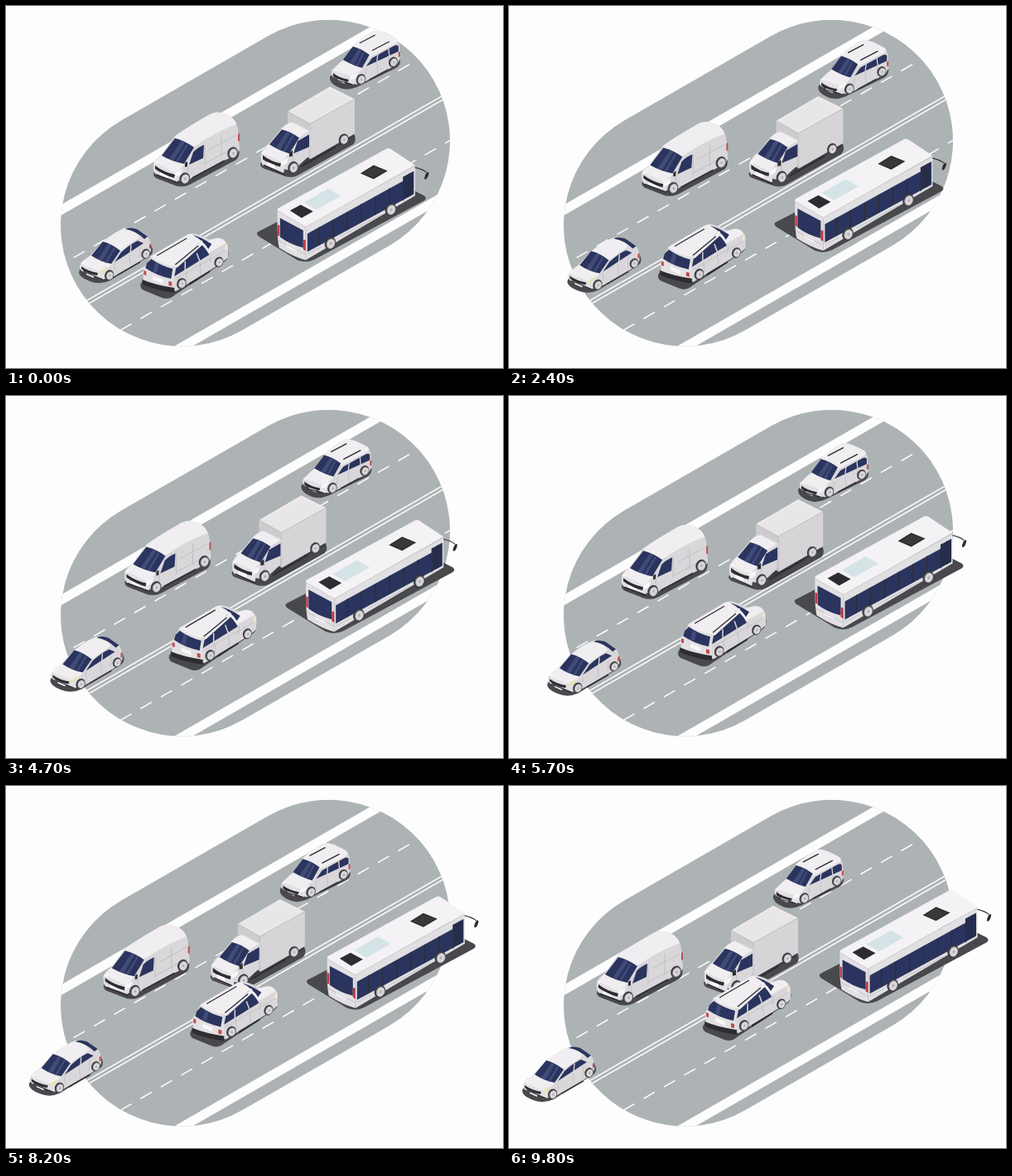
Recreate the animation shown at these times as an HTML page with a canvas. Size 600 by 438 pixels, loop 9900 ms.

```html
<!DOCTYPE html>
<html lang="en">
<head>
<meta charset="utf-8">
<title>Isometric traffic</title>
<style>
html, body { margin: 0; width: 100%; height: 100%; overflow: hidden; background: #fefdfe; }
canvas { display: block; }
</style>
</head>
<body>
<canvas id="stage" width="600" height="438"></canvas>
<script>
const g = document.getElementById('stage').getContext('2d');
const LOOP = 9900, STEP = 100, SLOPE = 0.577;
const roof = '#f0eef0', front = '#e2e0e2', side = '#d9d7da', crease = '#b9b8bc';
const glass = '#2b345e', glare = '#414b78', dark = '#2d2c31', shadow = '#49484c';

function fill(color, d) {
  g.fillStyle = color;
  g.fill(new Path2D(d));
}

function line(color, width, d) {
  g.strokeStyle = color;
  g.lineWidth = width;
  g.stroke(new Path2D(d));
}

function disc(color, x, y, rx, ry) {
  g.fillStyle = color;
  g.beginPath();
  g.ellipse(x, y, rx, ry, 0.4, 0, Math.PI * 2);
  g.fill();
}

function wheel(x, y, r = 6.8) {
  disc('#3b3a3f', x - 0.4, y - 0.2, r * 0.82, r);
  disc('#8b8a8e', x + 0.3, y + 0.2, r * 0.66, r * 0.82);
  disc('#d9d7d9', x + 0.4, y + 0.2, r * 0.56, r * 0.7);
  disc('#aeadb1', x + 0.4, y + 0.2, r * 0.18, r * 0.22);
}

// Road markings run along y = c - SLOPE * x.
function lane(c, from, to, width, dash = []) {
  g.strokeStyle = '#fefdfe';
  g.lineWidth = width;
  g.setLineDash(dash);
  g.beginPath();
  g.moveTo(from, c - SLOPE * from);
  g.lineTo(to, c - SLOPE * to);
  g.stroke();
  g.setLineDash([]);
}

function road() {
  const r = 146.4, a = Math.PI / 3;
  g.beginPath();
  g.arc(212.4, 264.6, r, a, a + Math.PI);
  g.arc(389.6, 162.4, r, a + Math.PI, a + 2 * Math.PI);
  g.closePath();
  g.fillStyle = '#adb3b4';
  g.fill();
  g.clip();
  const unit = Math.hypot(1, SLOPE), dash = [13.5 * unit, 11 * unit];
  lane(284.6, 40, 560, 11);
  lane(534.5, 150, 560, 11);
  lane(412, 60, 560, 1.6);
  lane(417, 60, 560, 1.6);
  lane(351, 81.5, 560, 1.5, dash);
  lane(471.3, 138, 560, 1.5, dash);
}

function minivan() {
  fill(shadow, 'M390 85Q391 80 403 75L470 52L475 63Q476 69 470 73L423 96Q411 101 402 97Q390 92 390 85Z');
  fill(side, 'M392 78L407 63L419 46Q434 32 443 28Q452 26 470 37L474 44L475 62L471 69L428 92Q421 94 414 91L395 84Z');
  fill(roof, 'M417 46Q432 33 443 28Q450 26 470 37Q474 40 470 43L438 60Z');
  fill(front, 'M392 78Q395 71 407 64L430 73L424 82L419 93L396 85Q391 83 392 78Z');
  fill(roof, 'M395 76Q398 69 407 63L430 73L419 84Z');
  fill(glass, 'M406 63L418 47Q427 49 438 57L429 73Q418 70 406 63Z');
  fill(glare, 'M414 67L425 50L429 52L419 69ZM421 70L430 54L432 55L424 71Z');
  fill(glass, 'M434 71L441 61L468 46Q472 44 473 47L473 53Z');
  line(side, 1.3, 'M448 56L447 65M461 49L462 59');
  line(dark, 1.4, 'M426 43L445 33M441 52L462 41');
  line(crease, 0.7, 'M434 74L433 82M447 67L448 80M462 60L461 66');
  fill(dark, 'M394 79Q401 85 413 87L412 90Q399 88 394 83Z');
  fill('#f7f5f7', 'M399 86L408 89V92L399 88ZM415 83L424 80L420 86L414 88ZM392 76L397 73L396 77Z');
  fill('#bc4b50', 'M473 54L475 53V59L473 60Z');
  line(dark, 1.2, 'M397 87L417 93M438 87L460 75');
  wheel(428, 87);
  wheel(467, 66, 6.4);
}

function van() {
  fill(shadow, 'M178 203Q179 197 190 190L272 154L281 173Q283 181 278 186L222 216Q212 221 201 216L183 209Q178 207 178 203Z');
  fill(side, 'M178 191L189 178L204 157L246 131Q255 126 267 131Q278 137 280 149L282 173L279 179L215 213L181 204Q177 200 178 191Z');
  fill(roof, 'M203 159Q206 154 246 131Q255 126 267 131Q276 136 278 143Q252 153 226 171Z');
  fill(front, 'M178 191Q180 184 190 179L216 191L209 202L207 214L182 204Q177 200 178 191Z');
  fill(roof, 'M181 190Q183 182 190 179L216 191L205 202Z');
  fill(glass, 'M188 181L204 160Q216 163 227 171L215 191Q200 188 188 181Z');
  fill(glare, 'M197 185L212 163L216 165L202 187ZM205 188L218 167L220 168L208 189Z');
  fill(glass, 'M221 192L226 177Q230 172 239 168L238 184Z');
  line(crease, 0.8, 'M219 194L220 205M240 168L240 193M260 156V182M245 174L278 156M241 190L278 170');
  fill(dark, 'M180 193Q190 201 204 204L203 208Q189 204 180 197ZM216 190L219 188V194L216 195Z');
  fill('#f8f6f8', 'M186 201L196 206V210L186 206ZM204 202L213 197L211 204L204 207ZM178 190L183 186L182 192Z');
  fill('#b85257', 'M280 155L282 154V163L280 164Z');
  line(dark, 1.7, 'M181 204L208 214M225 208L264 187');
  wheel(216, 209, 7.5);
  wheel(274, 178, 7.5);
}

function truck() {
  fill(shadow, 'M307 190L330 174L404 139L420 154Q424 162 419 167L353 204Q344 209 333 204L311 196Q307 194 307 190Z');
  fill('#3d3c41', 'M358 184L420 151V158L358 193Z');
  fill('#cdcbcd', 'M340 127L367 142V184L340 169Z');
  fill('#d6d4d6', 'M367 142L421 112V154L367 185Z');
  fill('#e9e6e8', 'M340 127L391 97L421 112L367 142Z');
  line('#c0bec1', 1, 'M340 127L367 142L421 112M367 142V184');
  line('#f3f0f2', 0.8, 'M343 126L391 99L418 112');
  fill(side, 'M308 178L320 163L333 147Q340 140 349 141L367 150V180L346 199L312 192Q307 189 308 178Z');
  fill(roof, 'M332 149Q337 142 345 140L366 151L352 160Z');
  fill(front, 'M308 179Q310 170 319 165L342 176L337 188L335 203L311 193Q307 190 308 179Z');
  fill(roof, 'M311 178Q313 169 319 165L342 176L333 188Z');
  fill(glass, 'M318 167L333 149Q343 151 354 159L342 178Q329 174 318 167Z');
  fill(glare, 'M326 171L339 151L343 153L331 174ZM334 175L346 155L348 156L337 176Z');
  fill(glass, 'M347 178L352 163L366 155V170Z');
  line(crease, 0.8, 'M346 180L347 190M366 172V184');
  fill(dark, 'M310 180Q320 188 332 190L331 194Q318 191 310 185ZM342 177L346 174V181L342 182Z');
  fill('#f8f6f8', 'M315 188L325 192V197L315 193ZM332 188L341 183L339 190L332 193ZM308 177L313 173L312 179Z');
  line(dark, 1.7, 'M311 192L336 203M356 194L398 170');
  wheel(347, 195, 7.5);
  wheel(408, 161, 7);
}

function sedan() {
  fill(shadow, 'M88 321Q89 315 99 309L168 279L176 290Q179 297 174 301L126 331Q114 337 101 332Q88 327 88 321Z');
  fill(side, 'M89 313L102 300L118 283L141 269Q149 266 162 272L172 279Q176 286 175 296L168 304L127 328Q118 331 110 327L92 319Z');
  fill(roof, 'M117 284Q133 271 144 268Q155 268 161 279L137 296Z');
  fill(front, 'M89 313Q92 305 104 301L128 311L121 319L118 330L94 321Q88 318 89 313Z');
  fill(roof, 'M92 312Q95 304 104 300L128 311L116 321Z');
  fill(glass, 'M103 301L117 284Q128 287 138 295L127 311Q113 308 103 301Z');
  fill(glare, 'M111 305L123 287L127 289L116 308ZM119 309L130 291L132 292L122 310Z');
  fill(glass, 'M131 309L139 297Q150 287 159 283L166 286Z');
  fill(glass, 'M144 269Q149 266 158 269L171 278L167 281Q157 271 144 269Z');
  line(side, 1.4, 'M151 288L150 299');
  line(crease, 0.7, 'M131 310L131 319M149 300L150 312M162 291L161 304');
  fill(dark, 'M91 314Q99 320 111 322L110 325Q97 323 91 317Z');
  fill('#f8f6f8', 'M97 321L106 325V328L97 324ZM90 310L95 307L94 311Z');
  fill('#e5e4ae', 'M113 320L122 315L119 321L113 323Z');
  fill('#b94e54', 'M173 288L175 286V292L173 293Z');
  line(dark, 1.2, 'M93 320L117 330M136 324L162 309');
  wheel(125, 325, 6.6);
  wheel(169, 299, 6.2);
}

function wagon() {
  fill(shadow, 'M161 340Q161 335 170 331L255 286L267 298Q269 306 263 311L202 352Q195 358 187 355L165 346Q161 344 161 340Z');
  fill(side, 'M164 324L174 305L218 279Q225 274 243 284L263 286Q268 291 267 306L259 313L204 347L166 337Z');
  fill(front, 'M164 322L174 305L201 318L202 347L165 337Z');
  fill(roof, 'M173 305L217 279Q225 275 236 285L203 317Q186 315 173 305Z');
  fill(roof, 'M235 290L246 285Q260 279 264 289L241 302Z');
  fill(glass, 'M169 313L174 308Q185 316 200 320L198 332Q180 328 167 319Z');
  fill(glare, 'M176 323L179 312L183 315L181 325Z');
  fill(glass, 'M204 319L232 288Q240 295 244 303L202 329Z');
  fill(glass, 'M224 279Q233 281 247 290L243 296Q237 286 224 279Z');
  fill(roof, 'M202 319L235 285L237 290L206 318Z');
  line(side, 1.5, 'M215 311L215 322M229 301L233 312');
  line(dark, 1.3, 'M181 304L217 283M203 315L231 292');
  line(crease, 0.7, 'M216 323L217 335M233 313L234 327M246 302L245 312M204 332L265 297');
  fill('#c5494f', 'M165 322L168 323V328L165 327ZM195 335L199 336V341L195 340Z');
  fill('#f8f6f8', 'M176 328L188 333V338L176 333Z');
  fill(dark, 'M163 333Q180 340 202 343V349Q180 346 164 339ZM220 337L245 322V324L220 340Z');
  fill('#f1e9cf', 'M263 292L266 290V296L263 298Z');
  wheel(211, 338, 6.8);
  wheel(256, 312, 6.5);
}

function bus() {
  fill(shadow, 'M303 275L330 261L350 284L480 219L504 231Q508 234 504 237L372 308Q362 313 351 309L304 280Q301 277 303 275Z');
  fill(front, 'M327 249L361 268V309Q346 305 329 294Q326 282 327 249Z');
  fill('#e0dfe1', 'M361 268L493 195V231L361 309Z');
  fill('#f4f2f4', 'M327 249Q326 247 330 245L459 174Q462 173 466 176L493 194L361 269Z');
  line('#cbcacd', 0.9, 'M328 250L361 269L493 195M361 269V308');
  fill(glass, 'M330 258L358 273V294Q342 290 330 281Z');
  fill(glass, 'M363 277L479 213V236L363 299Z');
  fill('#252d50', 'M479 208L492 201V229L479 236Z');
  line(dark, 1.1, 'M377 269V291M394 260V282M411 251V273M428 241V263M445 232V254M462 222V245M479 208V237M486 204V232');
  line('#f4f2f4', 0.8, 'M492 198V231');
  fill('#be3b43', 'M327 266L329.5 267V280L327 279ZM358 284L361 285V298L358 296Z');
  fill('#f8f6f8', 'M338 289L350 295V299L338 293Z');
  line(crease, 0.8, 'M363 302L380 293M402 281L452 254M328 285L360 302');
  fill(dark, 'M342 249L355 242L370 250L356 258ZM427 204L443 194L460 201L443 211Z');
  fill('#3a3938', 'M430 204L443 196L457 201L443 209Z');
  fill('#d4e3e6', 'M359 239L388 222L404 231L374 248Z');
  line('#edf3f4', 0.9, 'M359 239L388 222L404 231');
  wheel(391, 289, 8);
  wheel(464, 248, 8);
  line(dark, 1.1, 'M493 197Q502 199 507 203');
  disc(dark, 507, 207, 1.8, 4.7);
}

const oncoming = { vx: -7.35, vy: 4.8 }, outgoing = { vx: 7.32, vy: -4.7 };
// Each entry: painter, velocity in px/s, starting offset.
const traffic = [
  [minivan, oncoming, 0.8, 2], [van, oncoming, 0, 0], [truck, oncoming, 0, 0.6],
  [sedan, oncoming, 0, 1], [wagon, outgoing, 1.3, -2], [bus, outgoing, 0.8, -1.6]
];

function paintAt(x, y, paint) {
  g.save();
  g.translate(x, y);
  paint();
  g.restore();
}

function draw(now) {
  const t = Math.floor(now % LOOP / STEP) * STEP / 1000;
  g.fillStyle = '#fefdfe';
  g.fillRect(0, 0, 600, 438);
  paintAt(0, 0.7, road);
  for (const [vehicle, { vx, vy }, x, y] of traffic) {
    paintAt(x + vx * t, y + vy * t, vehicle);
  }
}

const start = performance.now();
function tick() {
  draw(performance.now() - start);
  requestAnimationFrame(tick);
}
tick();
</script>
</body>
</html>
```
